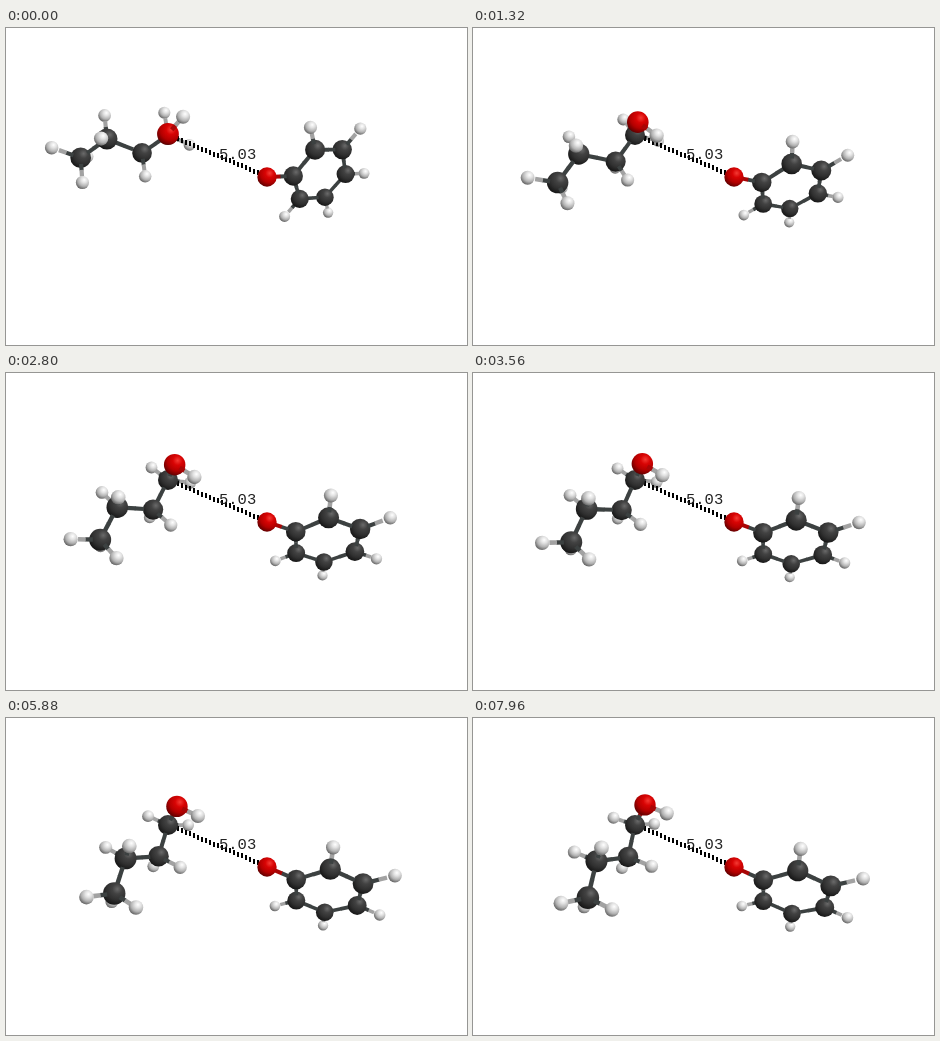
Recreate the animation shown at these times as an HTML page with a canvas. Size 461 by 317 pixels, loop 8 s.

```html
<!DOCTYPE html>
<html lang="en">
<head>
<meta charset="utf-8">
<title>Molecules at fixed distance</title>
<style>
html, body { margin: 0; width: 100%; height: 100%; overflow: hidden; background: #fff; }
canvas { display: block; }
</style>
</head>
<body>
<canvas id="stage" width="461" height="317"></canvas>
<script>
const ctx = document.getElementById('stage').getContext('2d');
const LOOP = 8000, STEP = 40, CAMERA = 300;
const TIMES = [0, 800, 1920, 7960];

// tones run from the lit upper right to the shaded lower left
const LOOK = {
  C: { r: 10, bond: '#3c4141', tones: ['#6a6a6a', '#424242', '#303030', '#141414'] },
  O: { r: 9.7, bond: '#a80606', tones: ['#f43a34', '#d80404', '#b40000', '#5c0000'] },
  H: { r: 6.2, bond: '#a2a2a2', tones: ['#ffffff', '#e2e2e2', '#b2b2b2', '#5e5e5e'] },
};

// Builds a molecule in bond-length units along its own axes.
function molecule() {
  const atoms = [], bonds = [];
  const add = (kind, at, to) => {
    const atom = { kind, at };
    atoms.push(atom);
    if (to) bonds.push([to, atom]);
    return atom;
  };
  return { atoms, bonds, add };
}

// Zigzag chain with tetrahedral carbons; the alcohol sits on the first one.
function butanol() {
  const m = molecule(), { add } = m;
  let carbon, oxygen;
  for (let i = 0; i < 4; i++) {
    const along = 1.25 * i, odd = i % 2, up = odd ? -0.88 : 0;
    const out = odd ? -0.63 : 0.63;
    carbon = add('C', [along, up, 0], carbon);
    add('H', [along, up + out, -0.89], carbon);
    if (i) add('H', [along, up + out, 0.89], carbon);
    else oxygen = add('O', [0, 0.83, 1.17], carbon);
    if (i === 0) add('H', [-0.89, -0.63, 0], carbon);
    if (i === 3) add('H', [along + 0.89, up + 0.63, 0], carbon);
  }
  m.hydroxyl = add('H', [0, 0, 0], oxygen);
  return m;
}

// Flat six-ring hanging from an oxygen at the origin.
function phenoxide() {
  const m = molecule(), { add, bonds } = m;
  const oxygen = add('O', [0, 0, 0]), carbons = [];
  for (let i = 0; i < 6; i++) {
    const angle = i * Math.PI / 3;
    const spot = r => [2.67 - r * Math.cos(angle), r * Math.sin(angle), 0];
    carbons.push(add('C', spot(1.4), i ? carbons[i - 1] : oxygen));
    if (i) add('H', spot(2.49), carbons[i]);
  }
  bonds.push([carbons[5], carbons[0]]);
  return m;
}

// Each pose holds the on-screen x, y, depth of the molecule's axes at one of TIMES.
const chain = {
  ...butanol(), anchor: [162, 107], settle: 0.9,
  poses: [
    [[-23.2, 1.5, 6], [-3, -18.6, 14], [2.1, 12.4, 18]],
    [[-22.8, 3.8, 6], [-6.1, -20.8, 10], [2.8, 6.4, 20]],
    [[-20.1, 9.3, 8], [-9.5, -19.2, 6], [11.2, 2.8, 21]],
    [[-14, 13.2, 11], [-12.2, -16.9, 8], [16.4, -3.6, 18]],
  ],
  twist: [2.32, 0.58, 0.14, -0.07],
};
const ring = {
  ...phenoxide(), anchor: [261, 149], settle: 2.4,
  poses: [
    [[21.4, -0.8, -8], [4.9, -21.2, 13], [0, 0, 0]],
    [[21.7, 1.1, -8], [8.1, -19, 16], [0, 0, 0]],
    [[23, 6.5, -6], [10.5, -16.8, 20], [0, 0, 0]],
    [[23.5, 10.5, -4], [11.3, -14.2, 21], [0, 0, 0]],
  ],
};

const mix = (a, b, p) => a + (b - a) * p;
const decay = (s, k) => (1 - Math.exp(-k * s)) / (1 - Math.exp(-k));

function progress(t, settle) {
  const leg = t < TIMES[1] ? 0 : t < TIMES[2] ? 1 : 2;
  const s = Math.min(1, (t - TIMES[leg]) / (TIMES[leg + 1] - TIMES[leg]));
  return { leg, p: [s * (0.75 + 0.25 * s), s * (1.6 - 0.6 * s), decay(s, settle)][leg] };
}

function turnHydroxyl(atom, angle) {
  const c = Math.cos(angle), s = Math.sin(angle);
  atom.at = [-0.92 * s, 0.99 - 0.75 * c, 1.4 + 0.53 * c];
}

function place({ atoms, poses, anchor, settle, hydroxyl, twist }, t) {
  const { leg, p } = progress(t, settle);
  if (twist) turnHydroxyl(hydroxyl, mix(twist[leg], twist[leg + 1], p));
  const axes = poses[leg].map((axis, i) =>
    axis.map((v, j) => mix(v, poses[leg + 1][i][j], p)));
  for (const atom of atoms) {
    const [x, y, z] = [0, 1, 2].map(j =>
      atom.at.reduce((sum, v, i) => sum + v * axes[i][j], 0));
    const zoom = 1 / (1 - z / CAMERA);
    Object.assign(atom, { x: anchor[0] + x * zoom, y: anchor[1] + y * zoom, z, zoom });
  }
}

function drawAtom({ kind, x, y, zoom }) {
  const { r, tones } = LOOK[kind], size = r * zoom;
  const lx = x + size * 0.28, ly = y - size * 0.4;
  const shade = ctx.createRadialGradient(lx, ly, 0, lx, ly, size * 1.49);
  [0, 0.3, 0.65, 1].forEach((stop, i) => shade.addColorStop(stop, tones[i]));
  ctx.fillStyle = shade;
  ctx.beginPath();
  ctx.arc(x, y, size, 0, Math.PI * 2);
  ctx.fill();
}

// Half a stick, from the surface of one atom to the middle of the bond.
function drawHalfBond(a, b) {
  ctx.strokeStyle = LOOK[a.kind].bond;
  ctx.lineWidth = 4 * a.zoom;
  ctx.beginPath();
  ctx.moveTo(mix(a.x, b.x, 0.25), mix(a.y, b.y, 0.25));
  ctx.lineTo(mix(a.x, b.x, 0.51), mix(a.y, b.y, 0.51));
  ctx.stroke();
}

function drawDistance() {
  const [x0, y0] = chain.anchor, [x1, y1] = ring.anchor;
  ctx.fillStyle = '#000';
  for (let x = x0 + 1; x < x1; x += 4) {
    ctx.fillRect(x, Math.round(mix(y0, y1, (x - x0) / (x1 - x0)) - 2.5), 2, 5);
  }
}

function drawLabel() {
  ctx.fillStyle = '#222';
  ctx.font = '15.5px "Liberation Mono", monospace';
  ctx.fillText('5.03', 213, 131);
}

function draw(t) {
  ctx.fillStyle = '#fff';
  ctx.fillRect(0, 0, 461, 317);

  const parts = [{ z: -1, paint: drawDistance }];
  for (const m of [chain, ring]) {
    place(m, t);
    for (const atom of m.atoms) parts.push({ z: atom.z, paint: () => drawAtom(atom) });
    for (const [a, b] of m.bonds) {
      for (const [from, to] of [[a, b], [b, a]]) {
        parts.push({ z: mix(from.z, to.z, 0.38), paint: () => drawHalfBond(from, to) });
      }
    }
  }
  parts.sort((a, b) => a.z - b.z).forEach(part => part.paint());
  drawLabel();
}

const start = performance.now();
function tick() {
  const t = (performance.now() - start) % LOOP;
  draw(Math.floor(t / STEP) * STEP);
  requestAnimationFrame(tick);
}
tick();
</script>
</body>
</html>
```
